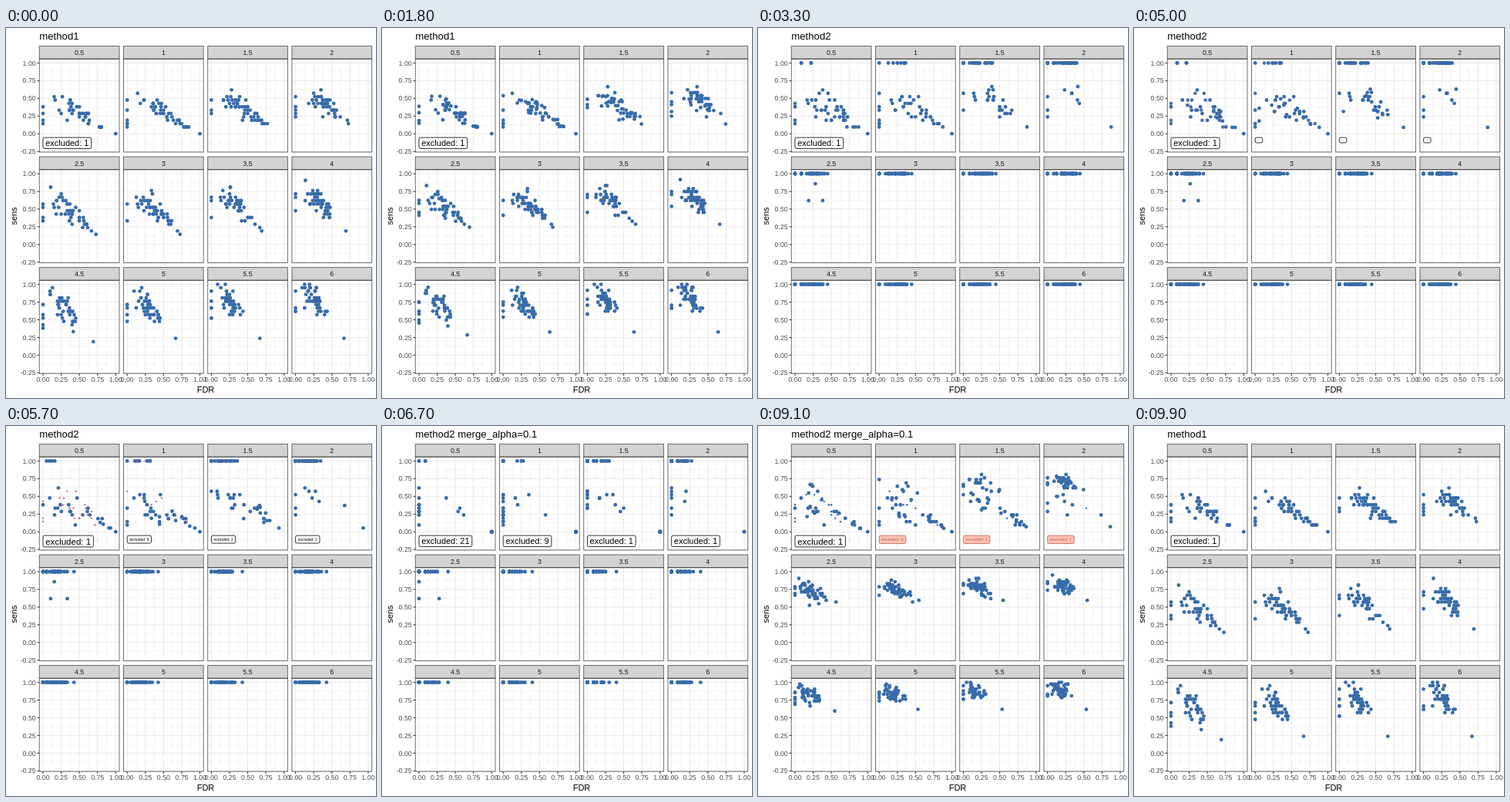
These frames come from a looping animation (480x480 px, 10 s). An HTML page with a canvas:

```html
<!DOCTYPE html>
<html lang="en">
<head>
<meta charset="utf-8">
<title>FDR and sensitivity</title>
<style>
html, body { margin: 0; width: 100%; height: 100%; overflow: hidden; background: #fff; }
canvas { display: block; width: 480px; height: 480px; }
</style>
</head>
<body>
<canvas id="stage" width="480" height="480"></canvas>
<script>
const ctx = document.getElementById('stage').getContext('2d');
const FONT = '"Liberation Sans", Arial, sans-serif';
const BLUE = [56, 108, 170], TOMATO = [255, 99, 71], WHITE = [255, 255, 255], BLACK = [0, 0, 0];
const LEFT = 43.3, TOP = 40.1, COL = 109.2, ROW = 143.6, WIDTH = 103.7, HEIGHT = 120.9;
const STRIP = 16.7, UNIT_X = 94.3, UNIT_Y = 91.8, RADIUS = 2.4;
const PANELS = 12, POINTS = 50, POSITIVES = 21;
const TITLES = ['method1', 'method2', 'method2 merge_alpha=0.1'];
const EXCLUDED_LAST = [21, 9, 1, 1];
// First frame and frame count of each move to the next state, at 10 frames a second.
const MOVES = [[17, 17], [50, 18], [84, 16]];

const lerp = (a, b, t) => a + (b - a) * t;
const clamp = (v, lo, hi) => Math.max(lo, Math.min(hi, v));
const mix = (a, b, t) => `rgb(${a.map((v, i) => Math.round(lerp(v, b[i], t))).join(',')})`;

function makeRandom(seed) {
  return () => {
    seed = (seed + 0x6D2B79F5) | 0;
    let t = Math.imul(seed ^ (seed >>> 15), 1 | seed);
    t = (t + Math.imul(t ^ (t >>> 7), 61 | t)) ^ t;
    return ((t ^ (t >>> 14)) >>> 0) / 4294967296;
  };
}

// A result is a pair of counts: true hits out of 21, and false hits.
const NOTHING_FOUND = [0, 1];
const place = ([hits, misses]) => ({ x: misses / (hits + misses), y: hits / POSITIVES });

// The weakest run of a panel, far from the others.
function straggler(effect) {
  const first = [Math.round(2 + effect / 2), Math.round(7 + effect / 2)];
  return effect > 2
    ? [first, [POSITIVES, 17], [POSITIVES, 14]]
    : [first, [2, 14], NOTHING_FOUND];
}

// One simulated run: its result under each of the three methods.
function simulate(effect, random) {
  const normal = () => (random() + random() + random() + random() - 2) * 1.73;
  const falseHits = v => { const n = Math.max(0, Math.round(v)); return n === 1 ? 2 : n; };
  const hitCount = v => clamp(Math.round(v), 2, POSITIVES);

  const clean = random() < 0.1;
  const misses = clean ? 0 : Math.max(2, Math.round(5.9 + 2.1 * normal()));
  const drift = clean ? 0 : 0.5 * (6 - misses);
  const hits = hitCount(3.6 + 2.5 * effect - 0.06 * effect ** 2 + drift + 2.3 * normal());

  const complete = random() < 1 / (1 + Math.exp(2.4 * (1.4 - effect)));
  const hits2 = complete ? POSITIVES : hitCount(hits + 2.4 * effect * random() + 0.7 * normal());
  const misses2 = clean ? 0 : Math.min(14, falseHits(misses + 1 + 2.6 * normal()));

  const fate = random();
  const cut = clean || fate < 0.35 ? 0 : Math.min(9, falseHits(misses2 * 0.7 - 1.5 + 1.5 * normal()));
  const lost = !complete && effect <= 2 && fate > 0.65;
  return [[hits, misses], [hits2, misses2], lost ? NOTHING_FOUND : [hits2, cut]];
}

function makePanel(index) {
  const effect = (index + 1) / 2;
  const random = makeRandom(index * 101 + 7);
  const last = EXCLUDED_LAST[index] || 0;
  const points = [];
  for (let i = 0; i < POINTS; i++) {
    let run = simulate(effect, random);
    if (i === 0) run = straggler(effect);
    if (i === 1 && effect <= 1) run = run.map(() => NOTHING_FOUND);
    const states = run.map(place);
    if (i >= POINTS - last) states[2] = null;
    points.push(states);
  }
  const before = index === 0 ? 1 : 0;
  return { name: String(effect), points, excluded: [before, before, last] };
}

const panels = Array.from({ length: PANELS }, (_, i) => makePanel(i));

function text(str, x, y, size, color, align) {
  ctx.font = `${size}px ${FONT}`;
  ctx.fillStyle = color;
  ctx.textAlign = align;
  ctx.fillText(str, x, y);
}

function line(x1, y1, x2, y2, width, color) {
  ctx.lineWidth = width;
  ctx.strokeStyle = color;
  ctx.beginPath();
  ctx.moveTo(x1, y1);
  ctx.lineTo(x2, y2);
  ctx.stroke();
}

const plotX = (left, v) => left + 4.7 + v * UNIT_X;
const plotY = (top, v) => top + 5.3 + (1 - v) * UNIT_Y;

function drawGrid(left, top) {
  for (const major of [false, true]) {
    const width = major ? 1.07 : 0.53, offset = major ? 0 : 0.125;
    for (let v = offset; v <= 1; v += 0.25) {
      line(plotX(left, v), top, plotX(left, v), top + HEIGHT, width, '#ebebeb');
    }
    for (let v = offset - 0.25; v <= 1; v += 0.25) {
      line(left, plotY(top, v), left + WIDTH, plotY(top, v), width, '#ebebeb');
    }
  }
}

function drawBorder(name, left, top) {
  ctx.fillStyle = '#d3d3d3';
  ctx.fillRect(left, top - STRIP, WIDTH, STRIP);
  ctx.lineWidth = 1;
  ctx.strokeStyle = 'rgba(51, 51, 51, 0.7)';
  ctx.strokeRect(left, top - STRIP, WIDTH, STRIP);
  ctx.strokeRect(left, top, WIDTH, HEIGHT);
  text(name, left + WIDTH / 2, top - 5.2, 8.8, '#1a1a1a', 'center');
}

// Size of a part that grows in, shrinks out or stays.
const presence = (a, b, t) => !b ? 1 - t : !a ? t : 1;

function drawPoint(left, top, a, b, t) {
  if (!a && !b) return;
  const from = a || b, to = b || a;
  const leaving = b ? 0 : Math.min(1, t * 1.8);
  ctx.globalAlpha = 1 - 0.4 * leaving;
  ctx.fillStyle = mix(BLUE, [205, 75, 75], leaving);
  ctx.beginPath();
  ctx.arc(plotX(left, lerp(from.x, to.x, t)), plotY(top, lerp(from.y, to.y, t)),
    RADIUS * presence(a, b, t), 0, 7);
  ctx.fill();
  ctx.globalAlpha = 1;
}

function drawLabel(left, top, a, b, t) {
  if (!a && !b) return;
  const leaving = b ? 0 : t;
  let size = 11 * presence(a, b, t);
  if (a !== b && a && b) size *= 1 + 0.05 * Math.sin(Math.PI * t);
  if (size < 0.3) return;
  const str = 'excluded: ' + (!a || (b && t >= 0.5) ? b : a);
  const x = plotX(left, 0), y = top + 102;
  ctx.font = `${size}px ${FONT}`;
  ctx.beginPath();
  ctx.roundRect(x, y, ctx.measureText(str).width + 6.4, size * 0.73 + 6.4, 2);
  ctx.fillStyle = mix(WHITE, TOMATO, leaving * 0.8);
  ctx.fill();
  const ink = mix(BLACK, [225, 115, 95], Math.min(1, leaving * 1.7));
  ctx.lineWidth = 0.8;
  ctx.strokeStyle = ink;
  ctx.stroke();
  text(str, x + 3.2, y + 3.2 + size * 0.73, size, ink, 'left');
}

function drawAxes() {
  const bottom = TOP + 2 * ROW + HEIGHT;
  for (let v = -0.25; v <= 1; v += 0.25) {
    for (let row = 0; row < 3; row++) {
      const y = plotY(TOP + row * ROW, v);
      line(LEFT - 2.75, y, LEFT, y, 1.07, '#333');
      text(v.toFixed(2), LEFT - 4.6, y + 3.1, 8.8, '#4d4d4d', 'right');
    }
    if (v < 0) continue;
    for (let col = 0; col < 4; col++) {
      const x = plotX(LEFT + col * COL, v);
      line(x, bottom, x, bottom + 2.75, 1.07, '#333');
      text(v.toFixed(2), x, bottom + 11, 8.8, '#4d4d4d', 'center');
    }
  }
  text('FDR', 259, 472.7, 11, '#000', 'center');
  ctx.save();
  ctx.translate(14, 244);
  ctx.rotate(-Math.PI / 2);
  text('sens', 0, 0, 11, '#000', 'center');
  ctx.restore();
}

// The state left, the state entered, and the progress between them.
function stateAt(frame) {
  let state = 0;
  for (let i = 0; i < MOVES.length; i++) {
    const [start, length] = MOVES[i];
    const step = frame - start;
    if (step < 0) break;
    const next = (i + 1) % 3;
    if (step < length) {
      return { from: i, to: next, t: (step + 1) / length, title: TITLES[step < length / 2 ? i : next] };
    }
    state = next;
  }
  return { from: state, to: state, t: 0, title: TITLES[state] };
}

function draw(frame) {
  const { from, to, t, title } = stateAt(frame);
  ctx.fillStyle = '#fff';
  ctx.fillRect(0, 0, 480, 480);
  panels.forEach(({ name, points, excluded }, i) => {
    const left = LEFT + (i % 4) * COL, top = TOP + Math.floor(i / 4) * ROW;
    drawGrid(left, top);
    for (const p of points) drawPoint(left, top, p[from], p[to], t);
    drawLabel(left, top, excluded[from], excluded[to], t);
    drawBorder(name, left, top);
  });
  drawAxes();
  text(title, LEFT, 15.2, 13.2, '#000', 'left');
}

let shown = -1;
const begin = performance.now();
function tick() {
  const frame = Math.floor((performance.now() - begin) / 100) % 100;
  if (frame !== shown) draw(shown = frame);
  requestAnimationFrame(tick);
}
tick();
</script>
</body>
</html>
```
